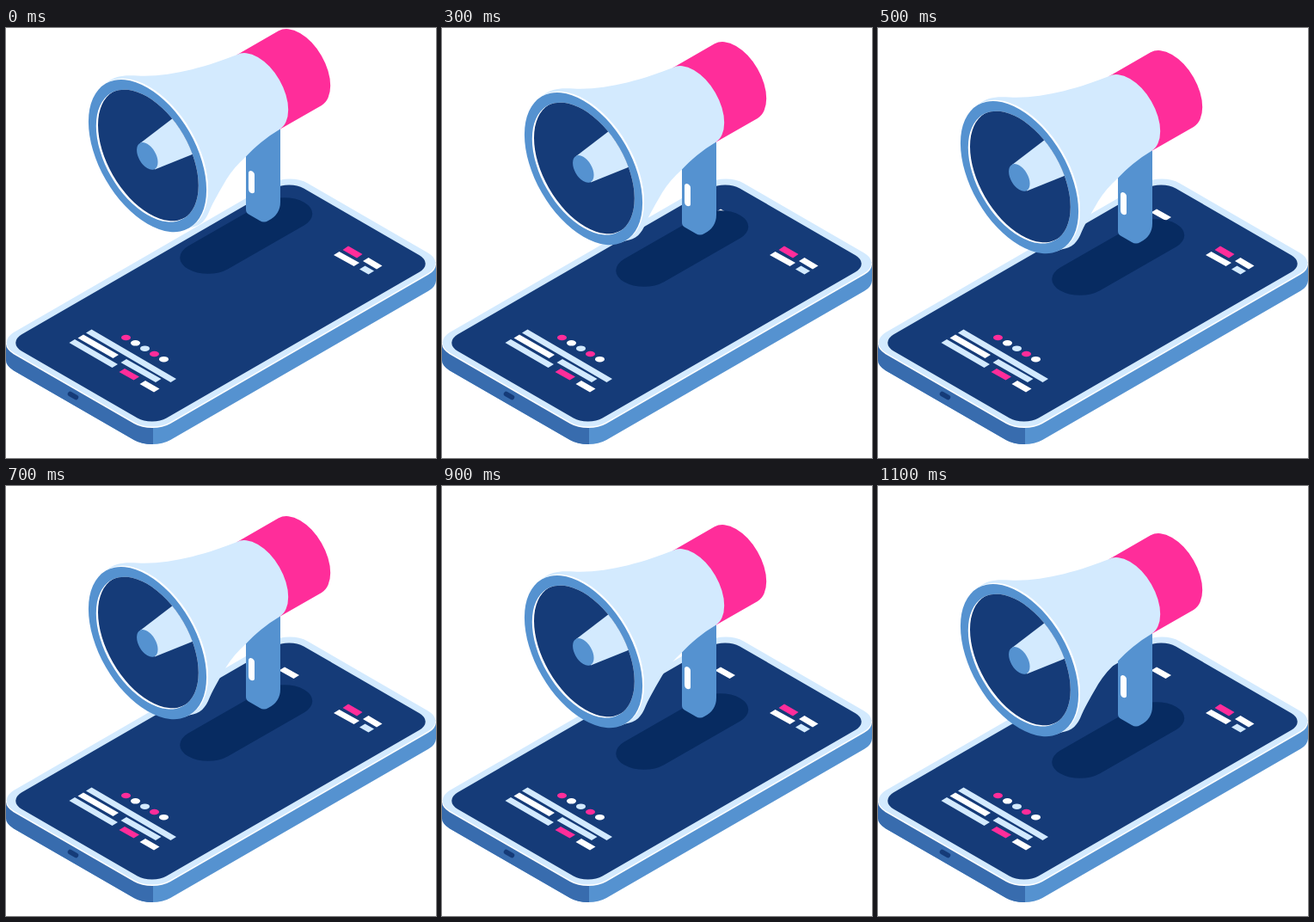
Write an HTML page that moves like this. It is 500x500 px and loops after 3.1 s.

```html
<!DOCTYPE html>
<html lang="en">
<head>
<meta charset="utf-8">
<title>Megaphone over a phone</title>
<style>
  html, body { margin: 0; width: 100%; height: 100%; overflow: hidden; background: #fff; }
  svg { display: block; width: 100%; height: 100%; }
  .white { fill: #fff; }
  .light { fill: #d3eafe; }
  .blue { fill: #5592d0; }
  .steel { fill: #386cae; }
  .navy { fill: #153b78; }
  .pink { fill: #ff2d9a; }
  /* an integer property keeps every pose on whole pixels */
  @property --fall { syntax: "<integer>"; inherits: false; initial-value: 0; }
  .drop {
    transform: translateY(calc(var(--fall) * 1px));
    animation: drop 3.1s infinite;
  }
  /* 11 jumps of 100 ms, then a 2 s rest */
  @keyframes drop {
    0% { --fall: 0; animation-timing-function: steps(11, end); }
    35.4839%, 100% { --fall: 54; }
  }
</style>
</head>
<body>
<svg viewBox="0 0 500 500">
  <defs>
    <rect id="slab" x="-105.35" y="-197.7" width="210.7" height="395.4" rx="24.5"
          transform="matrix(.866 .5 -.866 .5 250 319.5)"/>
    <g id="side">
      <use href="#slab" y="20.200"/>
      <path d="M0 366v20.500L500 293v-20.500z"/>
    </g>
    <ellipse id="rim" rx="97" ry="56" transform="translate(164.500 148) rotate(60)"/>
    <ellipse id="mouth" rx="84.300" ry="48.500" transform="translate(164.300 148) rotate(60)"/>
    <clipPath id="leftSide"><path d="M0 300h171v200H0z"/></clipPath>
    <clipPath id="inMouth"><use href="#mouth"/></clipPath>
    <clipPath id="inBore"><use href="#mouth" x="2.200" y="-1.300"/></clipPath>
  </defs>

  <!-- phone -->
  <use href="#side" class="blue"/>
  <g clip-path="url(#leftSide)"><use href="#side" class="steel"/></g>
  <path d="M74.500 425.500l7 4" stroke="#153b78" stroke-width="5.500" stroke-linecap="round"/>
  <use href="#slab" class="white" y="1.200"/>
  <rect class="light" x="-104.75" y="-197.1" width="209.5" height="394.2" rx="23.9"
        transform="matrix(.866 .5 -.866 .5 250 319.5)"/>
  <rect class="navy" x="-97.25" y="-189.35" width="194.5" height="378.7" rx="19.6"
        transform="matrix(.866 .5 -.866 .5 249.500 320)"/>

  <!-- screen -->
  <path class="white" d="M324 210.500l17 9.500-6.500 4-17-9.500z
    M387.500 260l23.500 13-6.500 4-23.500-13z M421.500 267l16 9.500-6.500 4-16-9.500z
    M90 356.500l41 23.500-6.500 4-41-23.500z M162 410l16.500 9.500-6.500 4-16.500-9.500z"/>
  <path class="light" d="M417.500 276.500l10.500 6-6.500 4-10.500-6z
    M99.500 350.500l98.500 57.500-6.500 4-98.500-57.500z M140 385l40.500 23-6.500 4-40.500-23z
    M80 362l50 29-6.500 4-50-29z"/>
  <path class="pink" d="M398 253.500l16.500 9.500-6.500 4.500-16.500-9.500z
    M138 396l17 9.500-6.500 4-17-9.500z"/>
  <g class="pink">
    <ellipse cx="139.500" cy="360" rx="5.500" ry="3.300"/>
    <ellipse cx="172.500" cy="379" rx="5.500" ry="3.300"/>
  </g>
  <g class="white">
    <ellipse cx="150.500" cy="366.300" rx="5.500" ry="3.300"/>
    <ellipse cx="183.500" cy="385.200" rx="5.500" ry="3.300"/>
  </g>
  <ellipse class="light" cx="161.500" cy="372.700" rx="5.500" ry="3.300"/>

  <g class="drop">
    <!-- shadow -->
    <path d="M235 462.700L323.500 374.400" stroke="#072b61" stroke-width="65.500"
          stroke-linecap="round" transform="scale(1 .577)"/>
    <!-- handle -->
    <path class="blue" d="M279 140V211q0 3.500 3 5.500l13 7.500q5 3 10 0 14-7 14-22V100z"/>
    <path class="white" d="M282 169c0-4 4-3.500 6-1q1 1 1 3v19c0 3-5 3-6.500-.500q-.5-1.500-.5-3.500z"/>
    <!-- horn -->
    <g transform="translate(0 .6)">
      <path class="pink" d="M268 31L317 2.700A50 28.870 60 0 1 367 89.300L318 117.500z"/>
      <path class="light" d="M116 64C127 54 140 54 153 55C190 57 235 44 268 30.700
        A50 28.870 60 0 1 318 117.300C302 127 290 137 279 149C270 157 262 166 256 176
        C248 190 243 198 237 211C232 224 226 230 213 232z"/>
      <use href="#rim" class="white" x="2" y="-1.200"/>
      <use href="#rim" class="blue"/>
      <use href="#mouth" class="white"/>
      <g clip-path="url(#inMouth)">
        <use href="#mouth" class="navy" x="2.200" y="-1.300"/>
        <g clip-path="url(#inBore)">
          <path class="light" d="M156 133.500L205 96L235 139L173 164z"/>
        </g>
      </g>
      <ellipse class="blue" rx="17.300" ry="10" transform="translate(164.300 148.300) rotate(60)"/>
    </g>
  </g>
</svg>
</body>
</html>
```
